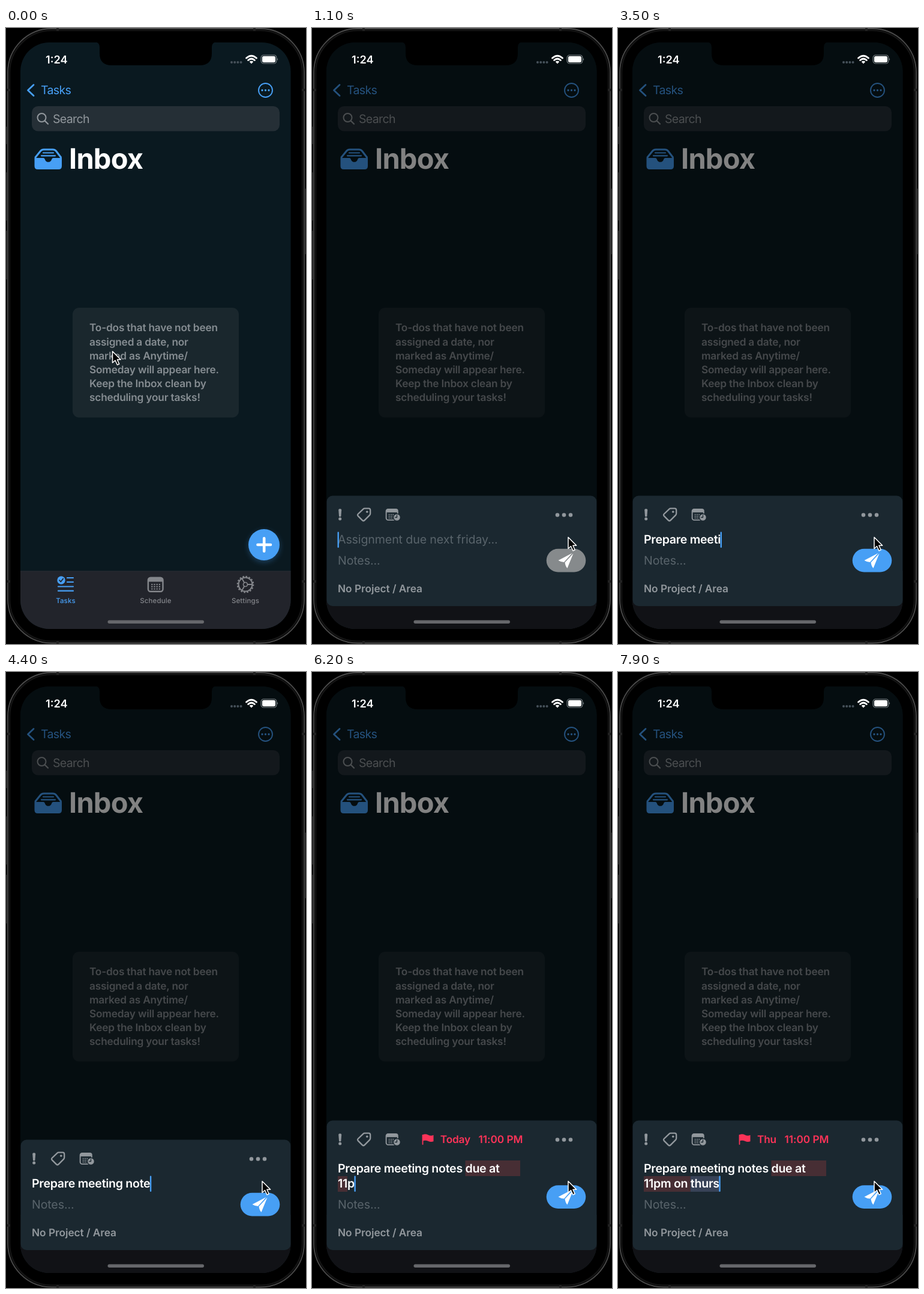
These frames come from a looping animation (500 by 1024 pixels, 8 s). An HTML page:

```html
<!DOCTYPE html>
<html lang="en">
<head>
<meta charset="utf-8">
<title>Inbox quick entry</title>
<style>
  html, body { margin: 0; width: 100%; height: 100%; overflow: hidden; background: #000; }
  svg { display: block; width: 100%; height: 100%; --blue: #479ff5; --grey: #92989d; --sheet: #1b2830; }
  text { font-family: Inter, Roboto, sans-serif; text-rendering: geometricPrecision; }
  .body { font-size: 19.6px; letter-spacing: -.7px; }
  .body.hint { letter-spacing: -.12px; }
  .body.bold { letter-spacing: -.3px; }
  .sub { font-size: 17.3px; letter-spacing: -.04px; }
  .note { font-size: 17.3px; letter-spacing: -.2px; }
  .tab { font-size: 11.5px; letter-spacing: .14px; font-weight: 500; text-anchor: middle; }
  .bold { font-weight: 600; }
  .blue { fill: var(--blue); }
  .grey { fill: var(--grey); }
  .white { fill: #fff; }
  .hint { fill: #59646b; }
  .red { fill: #fc3358; }
  .line { fill: none; stroke-linecap: round; stroke-linejoin: round; }
  .line.blue { fill: none; stroke: var(--blue); }
  .line.grey { fill: none; stroke: var(--grey); }
  .due { fill: #472e34; }
  .day { fill: #374257; }
  [hidden] { display: none; }
</style>
</head>
<body>
<svg viewBox="0 0 500 1024" preserveAspectRatio="none">
  <defs>
    <clipPath id="screen"><rect x="24" y="24" width="450.5" height="975" rx="48"/></clipPath>
    <filter id="glow" x="-50%" y="-50%" width="200%" height="200%"><feGaussianBlur stdDeviation="5"/></filter>
    <g id="calendar">
      <rect x="1.2" y="1.2" width="24.6" height="23" rx="4" fill="none" stroke="currentColor" stroke-width="2.4"/>
      <path d="M1 8V5q0-4 4-4h17q4 0 4 4v3z" fill="currentColor"/>
      <path d="M6.5 12.5h15M6.5 16.2h15M6.5 20h15" stroke="currentColor" stroke-width="2.2" stroke-dasharray="2.2 2"/>
    </g>
  </defs>

  <!-- phone body -->
  <path d="M.5 164V193M.5 240V320M.5 337V418M499.5 267V376" stroke="#333" stroke-width="1.5"/>
  <rect x="3" y="1" width="494" height="1021.5" rx="73" fill="#000" stroke="#4c4c4c" stroke-width="1.8"/>
  <rect x="6" y="4" width="488" height="1015.5" rx="70" fill="none" stroke="#141414" stroke-width="2.5"/>
  <path d="M2 103h5M493 103h5M2 920h5M493 920h5M86 0v5M414 0v5M86 1019v5M414 1019v5" stroke="#222" stroke-width="4"/>

  <g clip-path="url(#screen)">
    <rect x="24" y="24" width="451" height="975" fill="#0a1920"/>

    <path class="line blue" d="M46 94.500L36.500 103.500L46 112.500" stroke-width="2.800"/>
    <text class="body blue" x="58" y="110">Tasks</text>
    <circle class="line blue" cx="432.500" cy="103.500" r="11.500" stroke-width="1.900"/>
    <path class="line blue" d="M427 103.500h0M432.500 103.500h0M438 103.500h0" stroke-width="3.300"/>

    <rect x="43" y="130" width="413" height="41.500" rx="10.500" fill="#252f36"/>
    <circle class="line grey" cx="59.500" cy="149" r="7" stroke-width="2"/>
    <path class="line grey" d="M65 154.500L70 159.500" stroke-width="2.200"/>
    <text class="body grey" x="78" y="158">Search</text>

    <path class="line blue" d="M49 215L57.500 204.500Q59.500 202 63 202H78Q81.500 202 83.500 204.500L91.500 215" stroke-width="3"/>
    <path class="line blue" d="M62 207.500H79M59 212.300H82" stroke-width="2.200"/>
    <path class="blue" d="M47.500 216H62c2 0 2.500 1.500 3.300 3.500 1 2.500 3 3.300 5.200 3.300s4.200-.8 5.200-3.300c.8-2 1.300-3.500 3.300-3.500H93V229.500q0 5.500-5.500 5.500H53q-5.500 0-5.500-5.500z"/>
    <text class="white" x="105" y="234.300" font-size="47" font-weight="700" letter-spacing="-.8">Inbox</text>

    <rect x="111" y="465" width="277" height="182.500" rx="11" fill="#1a272d"/>
    <g id="message" class="note bold" fill="#868d92"></g>

    <g id="add">
      <circle class="blue" cx="430" cy="862" r="26" opacity=".3" filter="url(#glow)"/>
      <circle class="blue" cx="430" cy="859" r="26"/>
      <path d="M419.500 859h21.500M430.200 848.300v21.500" class="line" stroke="#fff" stroke-width="4.600"/>
    </g>

    <rect x="24" y="903" width="451" height="97" fill="#22242b"/>
    <path d="M24 903h451" stroke="#2b2d34"/>
    <circle class="blue" cx="92" cy="918" r="6.700"/>
    <path d="M89 918l2.300 2.500L95.200 915.500" class="line" stroke="#22242b" stroke-width="1.800"/>
    <path class="line blue" d="M102 914h10M102 921h10M87 928.500h25M87 935.700h25" stroke-width="2.200"/>
    <use href="#calendar" x="235.700" y="912.500" color="#84868b"/>
    <g class="line" stroke="#84868b">
      <circle cx="399" cy="925" r="11.500" stroke-width="2"/>
      <circle cx="399" cy="925" r="13.300" stroke-width="2" stroke-linecap="butt" stroke-dasharray="2.700 2.523"/>
      <circle cx="399" cy="925" r="3.500" stroke-width="1.600"/>
      <path d="M402.500 925h8M397.200 922l-4-7M397.200 928l-4 7" stroke-width="1.800"/>
    </g>
    <text class="tab blue" x="99.500" y="955.500">Tasks</text>
    <text class="tab" x="249.500" y="955.500" fill="#84868b">Schedule</text>
    <text class="tab" x="399" y="955.500" fill="#84868b">Settings</text>

    <rect id="dim" x="24" y="24" width="451" height="976" opacity=".49" hidden/>

    <!-- status bar -->
    <path d="M148 23q8 1 8 9V42q0 20 20 20H323q20 0 20-20V32q0-8 8-9z"/>
    <text class="white bold" x="66" y="58.500" font-size="18.200">1:24</text>
    <path class="line" d="M376 57h0M381.200 57h0M386.400 57h0M391.600 57h0" stroke="#46515a" stroke-width="4"/>
    <g class="line" stroke="#fff" stroke-width="3" stroke-linecap="butt">
      <path d="M400.600 50q8.400-7.600 16.800 0M403.700 53.500q5.300-4.700 10.600 0"/>
    </g>
    <path class="white" d="M405.700 56q3.300-2.700 6.600 0l-3.300 3.500z"/>
    <rect x="425.200" y="45" width="25.600" height="14" rx="4.300" fill="none" stroke="#7c8488" stroke-width="1.200"/>
    <rect class="white" x="427" y="46.800" width="22" height="10.400" rx="2.600"/>
    <path d="M452 50q2.200 2 0 4z" fill="#7c8488"/>

    <g id="sheet" hidden>
      <rect id="panel" x="24.500" width="450" rx="10" fill="var(--sheet)"/>
      <g id="tools">
        <path class="grey" d="M44.200 801q0-1.800 2.500-1.800t2.500 1.800l-.8 10.200q-.2 1.300-1.700 1.300t-1.700-1.300z"/>
        <circle class="grey" cx="46.700" cy="816" r="2.500"/>
        <path class="line grey" d="M88 798.700h6.500q2.700 0 2.700 2.700v5.600q0 1.700-1.200 2.900l-8.500 8.500q-1.800 1.800-3.600 0l-7-7q-1.800-1.800 0-3.600l8.300-8q1.100-1.100 2.800-1.100z" stroke-width="2.300"/>
        <circle class="grey" cx="91.800" cy="804.200" r="1.800"/>
        <use href="#calendar" transform="translate(122.700 799) scale(.78)" color="#92989d"/>
        <circle cx="141.500" cy="813.500" r="6" class="grey" stroke="var(--sheet)" stroke-width="1.500"/>
        <path class="line" d="M141.500 810v3.500h-2.700" stroke="var(--sheet)" stroke-width="1.300"/>
        <path class="line grey" d="M409 809.500h0M420 809.500h0M431 809.500h0" stroke-width="6.600"/>
        <g id="deadline">
          <g id="flag">
            <path class="line" d="M184.500 802V817" stroke="#fc3358" stroke-width="1.800"/>
            <path class="red" d="M184 801.500q5-2.500 9.500 0t9 .3v10.500q-4.500 1.700-9-.5t-9.500 0z"/>
          </g>
          <text id="day" class="note bold red" x="264" y="815.300" text-anchor="end"></text>
          <text class="sub bold red" x="351.500" y="815.300" text-anchor="end">11:00 PM</text>
        </g>
      </g>

      <rect id="dueMark" class="due" y="812" height="26"/>
      <rect id="timeMark" class="due" y="838" height="26" x="43"/>
      <rect id="dayMark" class="day" y="838" height="26"/>
      <text id="placeholder" class="body hint" x="43" y="857">Assignment due next friday...</text>
      <text id="first" class="body bold white" x="43" y="831.500" xml:space="preserve"></text>
      <text id="last" class="body bold white" x="43" y="857" xml:space="preserve"></text>
      <rect id="caret" class="blue" y="837.500" width="2.400" height="26.500" rx="1.200"/>
      <text class="body hint" x="43" y="891.500">Notes...</text>
      <text class="sub bold grey" x="43" y="937.500">No Project / Area</text>

      <g id="send">
        <rect id="pill" x="390.700" y="865.700" width="65.600" height="38.800" rx="19.400"/>
        <path class="white" d="M433.500 873L410.500 885Q414 887.500 420 888zM435.500 873.500L421.500 888.500Q422.500 895 425.500 898z"/>
      </g>
    </g>

    <rect x="169.500" y="984.500" width="160.500" height="5.500" rx="2.750" fill="#66676b"/>
  </g>

  <circle id="touch" cx="426.500" cy="847" r="23.300" fill="#c2c3c5" fill-opacity=".9" stroke="#d4d4d4" stroke-opacity=".5" hidden/>
  <path id="pointer" d="M0 0V19L4.500 15L8 22.500L11.200 21L7.900 13.700H13.700Z" stroke="#fff" stroke-width="1.500" stroke-linejoin="round"/>
</svg>

<script>
const $ = id => document.getElementById(id);
const show = (id, on) => $(id).toggleAttribute('hidden', !on);
const shift = (id, x, y) => $(id).setAttribute('transform', `translate(${x} ${y})`);
const set = (id, attrs) => Object.entries(attrs).forEach(([k, v]) => $(id).setAttribute(k, v));
const advance = (id, n) => n ? $(id).getSubStringLength(0, n) : 0;

const LOOP = 8000, TICK = 100, LEFT = 43, RIGHT = 347;
const TASK = 'Prepare meeting notes due at 11pm on thurs';
const BREAK = TASK.indexOf(' 11'), DUE = TASK.indexOf('due');

// Tick at which each character of TASK appears.
const KEYS = [
  17, 19, 20, 22, 23, 25, 26, 27,
  29, 30, 32, 33, 35, 36, 37, 39,
  40, 42, 43, 44, 45, 47,
  48, 50, 51, 53, 53, 55, 57,
  58, 60, 62, 63, 65, 67, 69, 71,
  72, 74, 75, 76, 78
];
const PRESS = 10, OPEN = 11, WRAP = 62, PARSE_DAY = 78;

const MESSAGE = ['To-dos that have not been', 'assigned a date, nor', 'marked as Anytime/',
  'Someday will appear here.', 'Keep the Inbox clean by', 'scheduling your tasks!'];
$('message').innerHTML = MESSAGE
  .map((line, i) => `<text x="139" y="${504.3 + i * 23.2}">${line}</text>`).join('');

function movePointer(tick) {
  const p = Math.min(tick / 9, 1), eased = p * p * (3 - 2 * p);
  shift('pointer', 177.5 + 249.5 * eased, 537.5 + 309 * eased);
}

function drawEntry(tick) {
  const typed = TASK.slice(0, KEYS.filter(k => k <= tick).length);
  const wrapped = tick >= WRAP, dated = tick >= PARSE_DAY;
  const top = wrapped ? 745.5 : 777.5;

  set('panel', { y: top, height: 961 - top });
  shift('tools', 0, wrapped ? -32 : 0);
  shift('send', 0, wrapped ? -12.5 : 0);
  set('pill', { fill: typed ? 'var(--blue)' : '#868a8c' });
  show('placeholder', !typed);

  $('first').textContent = wrapped ? typed.slice(0, BREAK) : '';
  $('last').textContent = wrapped ? typed.slice(BREAK + 1) : typed;
  const length = $('last').textContent.length;
  set('caret', { x: LEFT - .5 + advance('last', length) });

  for (const id of ['deadline', 'dueMark', 'timeMark']) show(id, wrapped);
  show('dayMark', dated);
  if (!wrapped) return;

  $('day').textContent = dated ? 'Thu' : 'Today';
  shift('flag', dated ? 18 : 0, 0);
  const dueX = LEFT + advance('first', DUE);
  set('dueMark', { x: dueX, width: RIGHT - dueX });
  const timeWidth = advance('last', dated ? 8 : tick > WRAP + 1 ? 4 : 2);
  set('timeMark', { width: timeWidth });
  if (dated) {
    const end = advance('last', tick > PARSE_DAY ? length : length - 1);
    set('dayMark', { x: LEFT + timeWidth, width: end - timeWidth });
  }
}

let drawn = -1;
function frame() {
  const tick = Math.floor(performance.now() % LOOP / TICK);
  if (tick !== drawn) {
    drawn = tick;
    const open = tick >= OPEN;
    movePointer(tick);
    show('touch', tick === PRESS);
    set('add', { opacity: tick === PRESS ? .5 : 1 });
    show('dim', open);
    show('sheet', open);
    if (open) drawEntry(tick);
  }
  requestAnimationFrame(frame);
}
frame();
</script>
</body>
</html>
```
